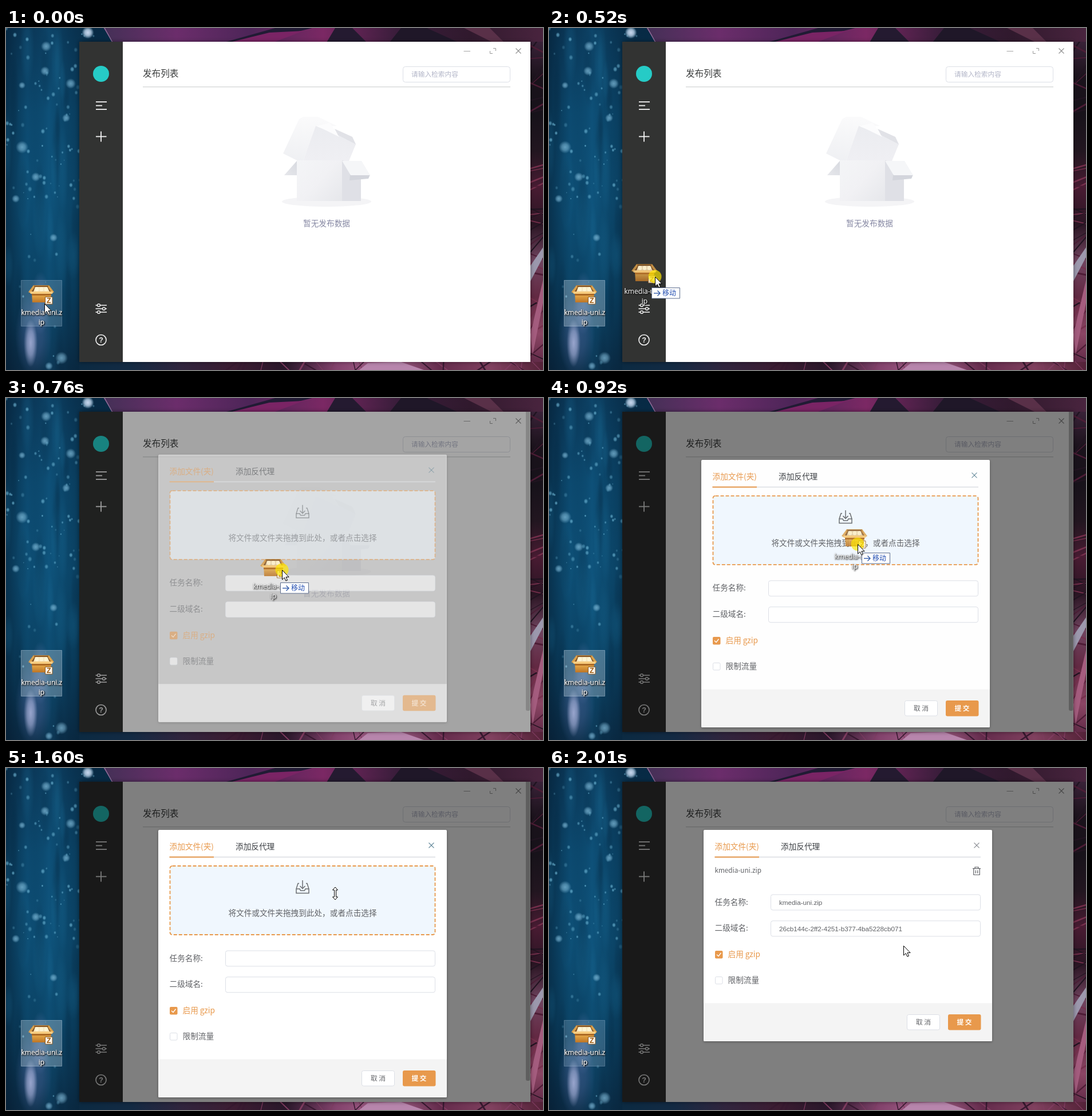
Animation, 938 px wide and 597 px high, one loop 2.04 s. Source, as an HTML page with a canvas:

```html
<!DOCTYPE html>
<html lang="zh-CN">
<head>
<meta charset="utf-8">
<title>发布列表</title>
<style>
html, body { margin: 0; width: 100%; height: 100%; overflow: hidden; background: #0a3f63; }
canvas { display: block; width: 938px; height: 597px; }
</style>
</head>
<body>
<canvas id="stage" width="938" height="597"></canvas>
<script>
const W = 938, H = 597, LOOP = 2040;
const CJK = '"Noto Sans CJK SC", "Noto Sans CJK", sans-serif';
const LABEL = '"Open Sans", "Noto Sans", sans-serif';
const INPUT = '"Liberation Sans", Arial, sans-serif';
const ORANGE = '#e8994c';
const BODY = 13.65, SMALL = 11.7;
let ctx = document.getElementById('stage').getContext('2d');

// ---------- helpers ----------
function poly(points, fill) {
  ctx.beginPath();
  for (let i = 0; i < points.length; i += 2) ctx.lineTo(points[i], points[i + 1]);
  ctx.closePath();
  ctx.fillStyle = fill;
  ctx.fill();
}
function line(color, width, ...points) {
  ctx.beginPath();
  for (let i = 0; i < points.length; i += 2) {
    if (points[i] === null) { ctx.moveTo(points[i + 2], points[i + 3]); continue; }
    ctx.lineTo(points[i], points[i + 1]);
  }
  ctx.strokeStyle = color;
  ctx.lineWidth = width;
  ctx.stroke();
}
function box(x, y, w, h, radius, fill, stroke, width = 1) {
  ctx.beginPath();
  ctx.roundRect(x, y, w, h, radius);
  if (fill) { ctx.fillStyle = fill; ctx.fill(); }
  if (stroke) { ctx.strokeStyle = stroke; ctx.lineWidth = width; ctx.stroke(); }
}
function circle(x, y, r, fill, stroke, width) {
  ctx.beginPath();
  ctx.arc(x, y, r, 0, Math.PI * 2);
  if (fill) { ctx.fillStyle = fill; ctx.fill(); }
  if (stroke) { ctx.strokeStyle = stroke; ctx.lineWidth = width; ctx.stroke(); }
}
function text(str, x, middle, size, color, { font = CJK, weight = 400, align = 'left' } = {}) {
  ctx.font = `${weight} ${size}px ${font}`;
  ctx.textAlign = align;
  ctx.fillStyle = color;
  ctx.fillText(str, x, middle + size * 0.37);
}
function gradient(x0, y0, x1, y1, ...colors) {
  const g = ctx.createLinearGradient(x0, y0, x1, y1);
  colors.forEach((c, i) => g.addColorStop(i / (colors.length - 1), c));
  return g;
}
function glow(x, y, rx, ry, rgb, alpha) {
  ctx.save();
  ctx.translate(x, y);
  ctx.scale(rx, ry);
  const g = ctx.createRadialGradient(0, 0, 0, 0, 0, 1);
  g.addColorStop(0, `rgba(${rgb},${alpha})`);
  g.addColorStop(0.5, `rgba(${rgb},${alpha * 0.7})`);
  g.addColorStop(1, `rgba(${rgb},0)`);
  ctx.fillStyle = g;
  ctx.fillRect(-1, -1, 2, 2);
  ctx.restore();
}
function randomizer(seed) {
  return () => (seed = (seed * 16807) % 2147483647) / 2147483647;
}
function bezierEase(p) {
  // cubic-bezier(.25, .1, .25, 1)
  if (p <= 0) return 0;
  if (p >= 1) return 1;
  let lo = 0, hi = 1, u = p;
  for (let i = 0; i < 20; i++) {
    u = (lo + hi) / 2;
    const x = 0.75 * u * (1 - u) + u ** 3;
    if (x < p) lo = u; else hi = u;
  }
  return 0.3 * u * (1 - u) ** 2 + 3 * u * u * (1 - u) + u ** 3;
}

// ---------- wallpaper ----------
function paintWallpaper() {
  const rand = randomizer(4217);
  ctx.fillStyle = gradient(0, 0, 0, H, '#0b3a5b', '#0c4a70', '#0d4f76', '#0b4568', '#0b2c46');
  ctx.fillRect(0, 0, W, H);
  ctx.fillStyle = gradient(0, 0, 150, 0, 'rgba(3,22,40,.5)', 'rgba(3,22,40,0)', 'rgba(20,100,145,.25)', 'rgba(3,30,50,.2)', 'rgba(3,22,40,.45)');
  ctx.fillRect(0, 0, W, H);
  for (let i = 0; i < 26; i++) {
    glow(rand() * 130, rand() * H, 5 + rand() * 9, 30 + rand() * 60, i % 2 ? '3,30,52' : '30,120,165', 0.2);
  }
  for (let i = 0; i < 120; i++) {
    const x = rand() * 170, y = rand() * (i % 3 ? 300 : H), r = 0.8 + rand() * 2.2;
    glow(x, y, r * 1.3, r * 1.6, '125,200,230', 0.2 + rand() * 0.5);
  }
  const orbs = [143, 8, 11, 68, 75, 8, 70, 32, 9, 113, 97, 9, 28, 208, 11, 17, 298, 7,
    52, 260, 8, 105, 157, 7, 83, 366, 7, 97, 576, 11, 75, 590, 7, 28, 100, 6];
  for (let i = 0; i < orbs.length; i += 3) glow(orbs[i], orbs[i + 1], orbs[i + 2], orbs[i + 2], '145,205,235', 0.65);
  glow(143, 8, 10, 10, '225,230,250', 0.8);
  glow(48, 535, 32, 75, '90,115,175', 0.45);
  glow(43, 550, 12, 42, '190,195,235', 0.75);
  glow(60, 480, 18, 55, '120,140,200', 0.4);

  // top edge
  poly([170, 0, W, 0, W, 60, 190, 30], gradient(170, 0, W, 0, '#443056', '#6b2d6b', '#4d2558', '#7b2864', '#3a1d3b', '#30192d', '#49243e'));
  poly([385, 24, 470, 0, 535, 0, 430, 26], '#211b34');
  poly([395, 24, 460, 8, 520, 5, 470, 24], '#7a2465');
  poly([575, 0, 605, 0, 630, 25, 560, 25], '#241a30');
  poly([690, 0, 735, 0, 790, 25, 670, 25], '#1f1728');
  poly([800, 0, 845, 0, 870, 25, 850, 25], '#593048');
  line('#93709c', 1.5, 172, 0, 186, 25);

  // right edge
  ctx.save();
  ctx.beginPath();
  ctx.rect(916, 24, 22, H);
  ctx.clip();
  ctx.fillStyle = gradient(0, 24, 0, H, '#392238', '#1a121b', '#17121a', '#221620', '#481b32', '#2a1523', '#70445f', '#622842', '#8b4564', '#572440');
  ctx.fillRect(916, 0, 22, H);
  for (let i = 0; i < 34; i++) {
    const y = 20 + rand() * 560;
    line(['#211421', '#77304d', '#4c1c35'][i % 3], 1 + rand() * 2, 914, y, 940, y + 20 - rand() * 65);
  }
  poly([916, 415, 938, 383, 938, 400, 916, 442], '#9c98ad');
  poly([916, 535, 938, 440, 938, 480, 920, 570], '#a45c7e');
  ctx.restore();

  // bottom edge
  ctx.fillStyle = gradient(128, 0, W, 0, '#0b2a42', '#132a43', '#30243d', '#3c1c32', '#29172a', '#84436d', '#a6658c', '#642b4c', '#81415f', '#542238');
  ctx.fillRect(128, 583, W, 14);
  for (let i = 0; i < 24; i++) {
    const x = 390 + rand() * 540;
    line(i % 2 ? '#371930' : '#7f3c60', 1 + rand() * 2, x, 582, x + 30 - rand() * 55, 598);
  }
  poly([617, 597, 632, 585, 690, 583, 730, 597], '#b886ad');
}
const wallpaper = document.createElement('canvas');
wallpaper.width = W;
wallpaper.height = H;
const screen = ctx;
ctx = wallpaper.getContext('2d');
paintWallpaper();
ctx = screen;

// ---------- application window ----------
function drawEmptyState() {
  ctx.beginPath();
  ctx.ellipse(560, 303, 78, 9, 0, 0, Math.PI * 2);
  ctx.fillStyle = '#f4f4f6';
  ctx.fill();
  poly([484, 219, 512, 159, 519, 155, 545, 155, 578, 171, 541, 172, 519, 232, 508, 231], gradient(510, 155, 500, 231, '#fafafb', '#eff0f3'));
  poly([541, 171, 606, 196, 611, 203, 599, 232, 519, 232], gradient(560, 170, 560, 232, '#ebecf0', '#efeff3'));
  poly([543, 171, 566, 166, 582, 190], '#fcfcfd');
  poly([574, 176, 605, 190, 611, 203, 580, 187], '#e1e2e7');
  poly([508, 232, 508, 257, 486, 257], gradient(486, 257, 508, 235, '#e6e7eb', '#d9dbe1'));
  poly([508, 231, 587, 231, 587, 302, 508, 302], gradient(508, 231, 587, 302, '#f4f5f7', '#f1f1f4', '#e6e7eb'));
  poly([587, 231, 620, 240, 620, 302, 587, 302], '#dfe0e6');
  poly([601, 256, 636, 256, 633, 263, 600, 266], '#d3d5dc');
  poly([587, 232, 621, 232, 636, 257, 602, 257], '#f5f6f8');
  text('暂无发布数据', 560, 341, BODY, '#8688a3', { align: 'center' });
}
function drawSidebar() {
  ctx.fillStyle = '#323332';
  ctx.fillRect(128, 24, 76, 559);
  circle(166, 80, 14, '#26cbc6');
  const white = '#f4f4f4';
  line(white, 1.8, 157, 129, 176, 129);
  line(white, 1.8, 157, 135.5, 168, 135.5);
  line(white, 1.8, 157, 142, 176, 142);
  line(white, 1.8, 157, 189.5, 175.5, 189.5);
  line(white, 1.8, 166, 180.5, 166, 198.5);
  [[484, 162], [490, 171], [496, 162]].forEach(([y, knob]) => {
    line(white, 1.5, 156.5, y, 176, y);
    circle(knob, y, 2.4, '#323332', white, 1.4);
  });
  circle(166, 544.5, 9, null, white, 1.6);
  text('?', 166, 544.5, 12.5, white, { font: INPUT, weight: 700, align: 'center' });
}
function drawWindow() {
  ctx.save();
  ctx.shadowColor = 'rgba(0,0,0,.45)';
  ctx.shadowBlur = 7;
  ctx.fillStyle = '#fff';
  ctx.fillRect(128, 24, 788, 559);
  ctx.restore();
  drawSidebar();
  line('#a5a5a5', 1, 799.5, 40.5, 811, 40.5);
  line('#9a9a9a', 1, 851, 35.5, 855.5, 35.5, 855.5, 40);
  line('#9a9a9a', 1, 845.5, 40, 845.5, 44.5, 850, 44.5);
  cross(895, 40, '#909090');
  text('发布列表', 239, 79, 15.6, '#3a3c3c');
  line('#d9dbdb', 1.6, 239, 102.8, 881, 102.8);
  box(693.5, 67.5, 187, 27, 4, '#fff', '#dcdfe6');
  text('请输入检索内容', 708, 80.5, SMALL, '#b3b6c8');
  drawEmptyState();
}
function cross(x, y, color) {
  line(color, 1.1, x - 4.5, y - 4.5, x + 4.5, y + 4.5);
  line(color, 1.1, x + 4.5, y - 4.5, x - 4.5, y + 4.5);
}

// ---------- dialog ----------
function drawDropZone() {
  ctx.setLineDash([6, 3]);
  box(286.5, 171, 463, 120, 4, '#f0f7fe', ORANGE, 1.8);
  ctx.setLineDash([]);
  const ink = '#6a6d70';
  line(ink, 1.5, 518, 196, 518, 210);
  line(ink, 1.5, 513.5, 206, 518, 210.5, 522.5, 206);
  line(ink, 1.5, 512, 201.5, 510, 201.5, 507, 211, 507, 218.5, 529, 218.5, 529, 211, 526, 201.5, 524, 201.5);
  line(ink, 1.5, 507, 211, 513, 211, 514.5, 214, 521.5, 214, 523, 211, 529, 211);
  text('将文件或文件夹拖拽到此处，或者点击选择', 518, 253, BODY, '#606266', { align: 'center' });
}
function drawFileRow() {
  text('kmedia-uni.zip', 285.5, 179, SMALL, '#606266');
  const ink = '#606266';
  line(ink, 1.2, 736, 175.5, 750, 175.5);
  line(ink, 1.2, 740, 175, 740, 173, 746, 173, 746, 175);
  line(ink, 1.2, 737.8, 176, 737.8, 186.5, 748.2, 186.5, 748.2, 176);
  line(ink, 1.2, 741.3, 178.5, 741.3, 184);
  line(ink, 1.2, 744.7, 178.5, 744.7, 184);
}
function field(label, y, value) {
  text(label, 285.5, y - 1, BODY, '#606266');
  box(383.5, y - 13.5, 366, 27, 3.5, '#fff', '#dcdfe6');
  if (value) text(value, 398, y, SMALL, '#606266', { font: INPUT });
}
function drawDialog(uploaded) {
  ctx.save();
  if (uploaded) ctx.translate(4, 0);
  const lift = uploaded ? 98 : 0;
  ctx.save();
  ctx.shadowColor = 'rgba(0,0,0,.35)';
  ctx.shadowBlur = 4;
  ctx.shadowOffsetY = 1;
  box(266, 108, 504, 467 - lift, 2, '#fff');
  ctx.restore();
  text('添加文件(夹)', 285.5, 137, BODY, ORANGE);
  text('添加反代理', 401, 137, BODY, '#3d4045');
  cross(743, 135, uploaded ? '#909399' : '#63899a');
  line('#e2e4e8', 2, 285.5, 155.5, 750, 155.5);
  line(ORANGE, 2, 285.5, 155.5, 363, 155.5);
  if (uploaded) drawFileRow(); else drawDropZone();
  ctx.translate(0, -lift);
  field('任务名称:', 332.5, uploaded && 'kmedia-uni.zip');
  field('二级域名:', 378.3, uploaded && '26cb144c-2ff2-4251-b377-4ba5228cb071');
  box(286, 417, 13.5, 13.5, 2, ORANGE);
  line('#fff', 1.4, 289, 423.7, 292, 426.5, 296.5, 420.8);
  text('启用 gzip', 308.5, 423.3, BODY, ORANGE);
  box(286.5, 462.5, 12.5, 12.5, 2, '#fff', '#dcdfe6');
  text('限制流量', 308.5, 467.7, BODY, '#606266');
  box(266, 508.5, 504, 66.5, [0, 0, 2, 2], '#f4f4f4');
  box(621.5, 528.5, 57, 26.5, 3, '#fff', '#dcdfe6');
  text('取 消', 650, 541.5, SMALL, '#606266', { align: 'center' });
  box(693, 528, 57.5, 27.5, 3, ORANGE);
  text('提 交', 721.5, 541.5, SMALL, '#fff', { align: 'center', weight: 700 });
  ctx.restore();
}

// ---------- desktop file and pointer ----------
function drawFile() {
  poly([48, 450, 75, 450, 79, 460, 45, 460], '#7c4a1c');
  poly([51, 452, 72, 452, 76, 460, 48, 460], '#f5e5bd');
  [54, 62, 70].forEach(x => circle(x, 456, 3.4, '#fff4d2'));
  poly([45, 460, 79, 460, 78, 479, 46, 479], gradient(0, 460, 0, 479, '#f0b65a', '#dc9c40', '#bd7526'));
  poly([45, 464, 79, 464, 79, 467, 45, 467], '#ac6a25');
  poly([48, 449, 39, 461, 43, 463, 50, 452], '#d9a04c');
  poly([75, 449, 84, 461, 80, 463, 73, 452], '#d9a04c');
  poly([42, 460, 82, 460, 81, 464, 43, 464], '#f7cc80');
  line('#c38a3c', 1.2, 48, 449.7, 75, 449.7);
  box(68.5, 469.5, 12.5, 12.5, 0, '#fffaf0', '#8a5a22');
  text('Z', 74.8, 475.8, 12.5, '#a05c12', { font: INPUT, weight: 700, align: 'center' });
  ctx.save();
  ctx.shadowColor = '#000';
  ctx.shadowBlur = 2.5;
  ctx.shadowOffsetX = ctx.shadowOffsetY = 0.8;
  for (let pass = 0; pass < 2; pass++) {
    text('kmedia-uni.z', 62.3, 496.8, 12, '#fff', { font: LABEL, align: 'center' });
    text('ip', 62, 513.8, 12, '#fff', { font: LABEL, align: 'center' });
  }
  ctx.restore();
}
function drawDesktopFile(active) {
  box(26.5, 440.5, 71, 80, 0, active ? 'rgba(185,205,220,.36)' : 'rgba(165,190,215,.25)',
    active ? 'rgba(200,220,235,.42)' : 'rgba(185,210,230,.3)');
  drawFile();
}
function drawDrag(dx, dy, hint) {
  ctx.save();
  ctx.translate(dx, dy);
  ctx.globalAlpha = 0.82;
  drawFile();
  ctx.globalAlpha = 1;
  if (hint) {
    box(74.5, 490.5, 49, 18.5, 0, '#fff', '#5f6f90');
    line('#2450a4', 1.3, 78, 500, 89, 500);
    line('#2450a4', 1.3, 84.5, 495.5, 89, 500, 84.5, 504.5);
    text('移动', 93, 500, 12, '#1f4bb0');
  }
  ctx.restore();
}
function outlined(points) {
  ctx.lineJoin = 'miter';
  poly(points, '#fff');
  ctx.strokeStyle = '#000';
  ctx.lineWidth = 1;
  ctx.stroke();
}
function drawArrow(x, y) {
  const tip = [0, 0, 0, 16.5, 3.8, 13, 6.4, 18.7, 9, 17.6, 6.5, 12, 11.6, 12];
  outlined(tip.map((v, i) => v + (i % 2 ? y : x) + 0.5));
}
function drawResize(x, y) {
  const half = [0, -11, 4.5, -6, 1.5, -6, 1.5, 6, 4.5, 6, 0, 11];
  const left = [-4.5, 6, -1.5, 6, -1.5, -6, -4.5, -6];
  outlined([...half, ...left].map((v, i) => v + (i % 2 ? y : x)));
}

// ---------- motion ----------
const path = [
  [0, 67, 481], [140, 66, 477], [260, 68, 477], [336, 81, 475], [424, 108, 466], [496, 185, 434], [528, 185, 434],
  [688, 427, 341], [752, 482, 300], [848, 529, 263], [912, 539, 255], [1072, 570, 224], [1104, 570, 224],
  [1200, 575, 218], [1872, 575, 219], [2000, 619, 310], [LOOP, 619, 310]
];
function pointer(t) {
  let i = 1;
  while (i < path.length - 1 && path[i][0] < t) i++;
  const [t0, x0, y0] = path[i - 1], [t1, x1, y1] = path[i];
  const k = Math.min(1, Math.max(0, (t - t0) / (t1 - t0)));
  return [x0 + (x1 - x0) * k, y0 + (y1 - y0) * k];
}
const PRESS = 130, DRAG = 270, OPEN = 676, DROP = 1600, DONE = 1630;

function render(t) {
  const step = Math.max(0, 560 + Math.floor((t - 560) / 32) * 32);
  const [x, y] = pointer(step);
  const uploaded = t >= DONE;
  ctx.drawImage(wallpaper, 0, 0);
  drawWindow();
  drawDesktopFile(t >= PRESS && !uploaded);

  const shade = bezierEase((t - OPEN) / 200);
  if (shade > 0) {
    ctx.fillStyle = `rgba(0,0,0,${shade * 0.5})`;
    ctx.fillRect(128, 24, 788, 559);
    if (t < 1660) {
      ctx.fillStyle = `rgba(0,0,0,${shade * 0.25})`;
      box(908, 24, 7.5, 522, [0, 0, 3, 3], ctx.fillStyle);
    }
    const show = bezierEase((t - OPEN) / 270);
    ctx.save();
    ctx.globalAlpha = show;
    ctx.translate(0, -20 * (1 - show));
    drawDialog(uploaded);
    ctx.restore();
  }

  if (t >= DRAG && t < DROP) {
    const [gx, gy] = pointer(step - 14);
    drawDrag(Math.round(gx - 65), Math.round(gy - 477), x > 128);
  }
  if (t >= PRESS && t < DROP) circle(x, y, 11.5, 'rgba(255,232,0,.68)');
  if (t >= DROP && t < DONE) drawResize(575, 219);
  else drawArrow(Math.round(x), Math.round(y));
}

const start = performance.now();
function tick() {
  render((performance.now() - start) % LOOP);
  requestAnimationFrame(tick);
}
tick();
</script>
</body>
</html>
```
